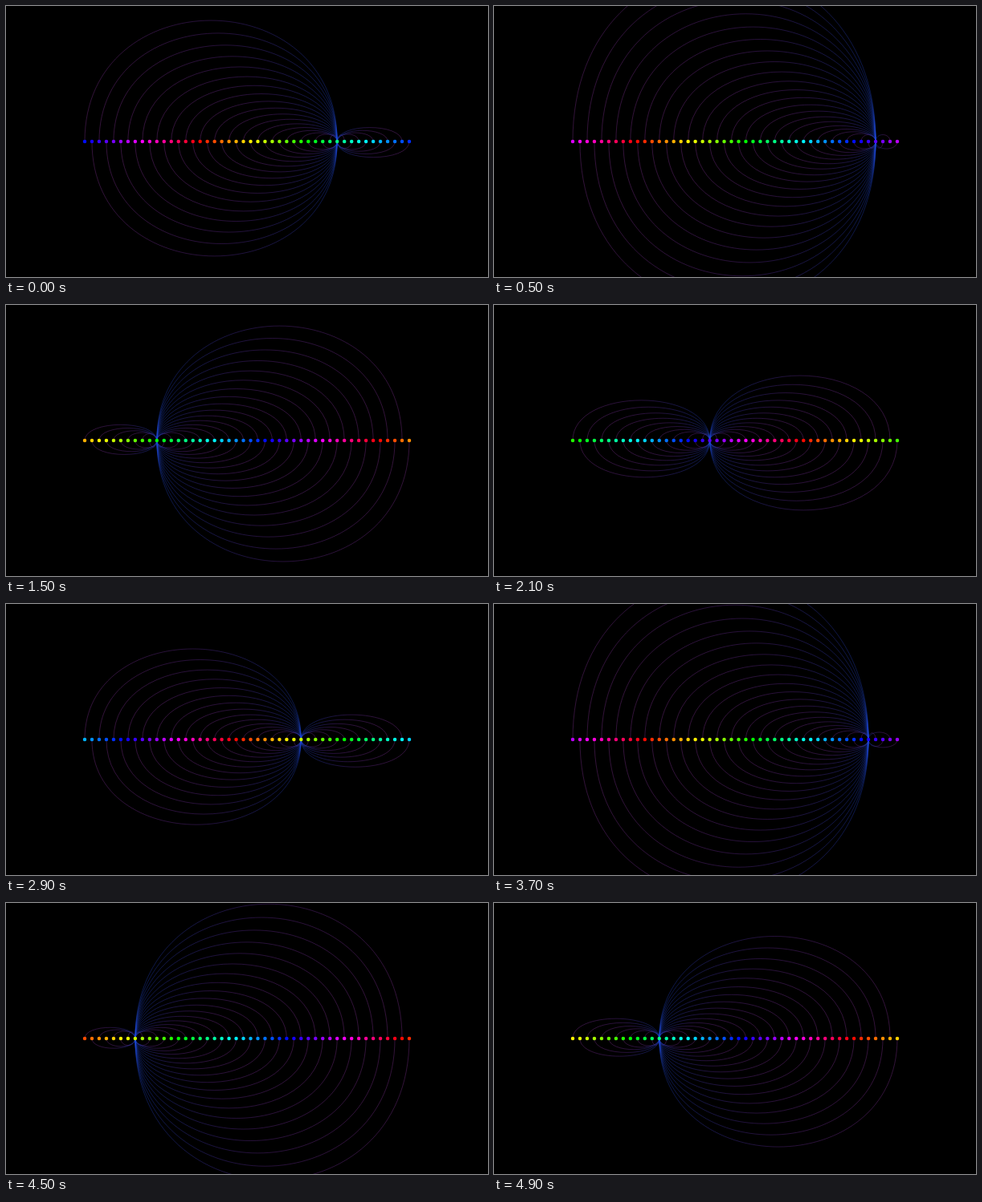
Recreate the animation shown at these times as an HTML page with a canvas. Size 600 by 338 pixels, loop 5000 ms.

```html
<!DOCTYPE html>
<html lang="en">
<head>
<meta charset="utf-8">
<title>Dots and arcs</title>
<style>
  html, body { margin: 0; width: 100%; height: 100%; overflow: hidden; background: #000; }
  canvas { display: block; width: 600px; height: 338px; }
</style>
</head>
<body>
<canvas id="stage"></canvas>
<script>
const W = 600, H = 338, MID = 169;
const COUNT = 46, LEFT = 98, GAP = 404 / 45, RADIUS = 2.25;
const LOOP = 5000, TICK = 100, RATE = 1.4048, START = 35.9;

const canvas = document.getElementById('stage');
const ctx = canvas.getContext('2d');
const ratio = window.devicePixelRatio || 1;
canvas.width = W * ratio;
canvas.height = H * ratio;
ctx.scale(ratio, ratio);

const dotX = i => LEFT + i * GAP;

// Even dots arch above the row, odd dots below; height grows with distance squared.
function drawArc(hub, i) {
  const x0 = dotX(hub), x1 = dotX(i);
  const peak = 8 + 0.1167 * (i - hub) ** 2;
  const y = MID + (i % 2 ? 1 : -1) * peak * 4 / 3;
  const tint = ctx.createLinearGradient(x0, 0, x1, 0);
  tint.addColorStop(0, 'rgba(28, 72, 220, 0.42)');
  tint.addColorStop(0.5, 'rgba(112, 48, 170, 0.42)');
  tint.addColorStop(1, 'rgba(150, 55, 170, 0.42)');
  ctx.strokeStyle = tint;
  ctx.beginPath();
  ctx.moveTo(x0, MID);
  ctx.bezierCurveTo(x0, y, x1, y, x1, MID);
  ctx.stroke();
}

function drawDot(i, step) {
  const hue = (i + step - 4.7) / COUNT * 360;
  ctx.fillStyle = `hsl(${((hue % 360) + 360) % 360}, 100%, 50%)`;
  ctx.beginPath();
  ctx.arc(dotX(i), MID, RADIUS, 0, Math.PI * 2);
  ctx.fill();
}

function draw(ms) {
  const tick = Math.floor((ms % LOOP) / TICK);
  const step = Math.floor(START + RATE * tick);
  const hub = step % COUNT;
  ctx.fillStyle = '#000';
  ctx.fillRect(0, 0, W, H);
  ctx.lineWidth = 0.8;
  for (let i = 0; i < COUNT; i++) if (i !== hub) drawArc(hub, i);
  for (let i = 0; i < COUNT; i++) drawDot(i, step);
}

let begin = null;
function loop(now) {
  if (begin === null) begin = now;
  draw(Math.max(0, now - begin));
  requestAnimationFrame(loop);
}
draw(0);
requestAnimationFrame(loop);
</script>
</body>
</html>
```
